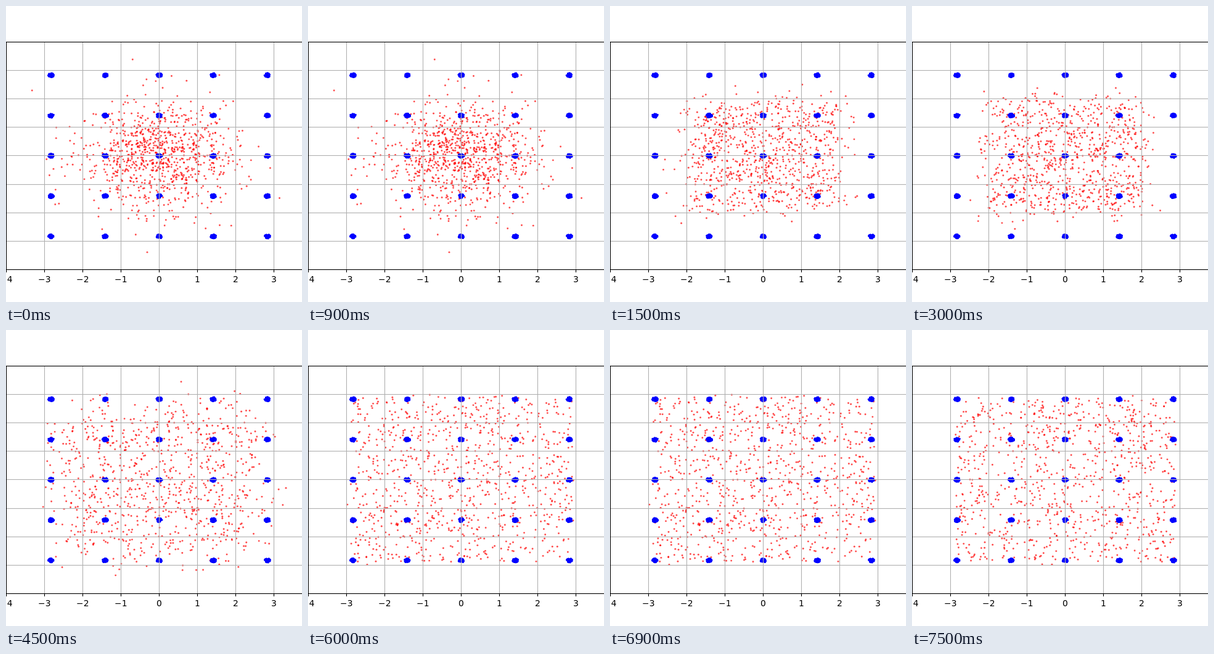
An HTML page with a canvas for the animation above (8000 ms loop, 480 by 480 pixels).

```html
<!DOCTYPE html>
<html lang="en">
<head>
<meta charset="utf-8">
<title>Samples approaching a grid of modes</title>
<style>
  html, body { margin: 0; width: 100%; height: 100%; overflow: hidden; background: #fff; }
  canvas { display: block; width: 480px; height: 480px; }
</style>
</head>
<body>
<canvas id="stage" width="480" height="480"></canvas>
<script>
const ctx = document.getElementById('stage').getContext('2d');
const LOOP = 8000, STEP = 1500, SAMPLES = 900;
const TOP = 58, BOTTOM = 427, LINE = 1.11;

const toX = x => 248 + 62 * x;
const toY = y => 242.4 - 46.2 * y;

// Each stage is a uniform box (half sizes) blurred by Gaussian noise.
const stages = [
  { halfX: 0, halfY: 0, noise: 1 },
  { halfX: 1.95, halfY: 1.9, noise: 0.29 },
  { halfX: 2.0, halfY: 1.95, noise: 0.24 },
  { halfX: 2.5, halfY: 2.5, noise: 0.42 },
  { halfX: 2.86, halfY: 2.86, noise: 0.08 },
  { halfX: 2.86, halfY: 2.86, noise: 0.08 }
];

function randomSource(seed) {
  const uniform = () => {
    seed = (seed + 0x6D2B79F5) | 0;
    let t = Math.imul(seed ^ (seed >>> 15), 1 | seed);
    t = (t + Math.imul(t ^ (t >>> 7), 61 | t)) ^ t;
    return ((t ^ (t >>> 14)) >>> 0) / 4294967296;
  };
  const normal = () =>
    Math.sqrt(-2 * Math.log(1 - uniform())) * Math.cos(2 * Math.PI * uniform());
  return { uniform, normal };
}

function dot(x, y, radius) {
  ctx.beginPath();
  ctx.arc(toX(x) + 0.5, toY(y) + 0.5, radius, 0, 2 * Math.PI);
  ctx.fill();
}

function drawSamples(index) {
  const { halfX, halfY, noise } = stages[index];
  const { uniform, normal } = randomSource(101 + index * 37);
  ctx.fillStyle = 'rgba(255, 0, 0, 0.7)';
  for (let i = 0; i < SAMPLES; i++) {
    const x = halfX * (2 * uniform() - 1) + noise * normal();
    const y = halfY * (2 * uniform() - 1) + noise * normal();
    dot(x, y, 1.45);
  }
}

function drawModes() {
  const { uniform } = randomSource(5);
  ctx.fillStyle = '#00f';
  for (let row = -2; row <= 2; row++) {
    for (let col = -2; col <= 2; col++) {
      for (let i = 0; i < 60; i++) {
        const angle = 2 * Math.PI * uniform();
        const radius = 0.075 * Math.sqrt(uniform());
        dot(col * Math.SQRT2 + radius * Math.cos(angle),
            row * Math.SQRT2 + radius * Math.sin(angle), 1.5);
      }
    }
  }
}

const inset = (LINE - 1) / 2;
const horizontal = y => ctx.fillRect(0, y - inset, 480, LINE);
const vertical = (x, top, bottom) => ctx.fillRect(x - inset, top, LINE, bottom - top);

function drawAxes() {
  ctx.fillStyle = '#b0b0b0';
  for (let k = -3; k <= 3; k++) {
    vertical(toX(k), TOP, BOTTOM);
    horizontal(Math.round(toY(k)));
  }
  ctx.fillStyle = '#000';
  horizontal(TOP);
  horizontal(BOTTOM);
  vertical(0, TOP, BOTTOM);

  ctx.font = '13.89px "DejaVu Sans", sans-serif';
  for (let k = -4; k <= 3; k++) {
    const label = String(k).replace('-', '\u2212');
    vertical(toX(k), BOTTOM, BOTTOM + 5);
    ctx.fillText(label, Math.round(toX(k) - ctx.measureText(label).width / 2), 448);
  }
}

function draw(index) {
  ctx.fillStyle = '#fff';
  ctx.fillRect(0, 0, 480, 480);
  drawSamples(index);
  drawModes();
  drawAxes();
}

const start = performance.now();
let shown = -1;
function tick() {
  const index = Math.floor(((performance.now() - start) % LOOP) / STEP);
  if (index !== shown) draw(shown = index);
  requestAnimationFrame(tick);
}
tick();
</script>
</body>
</html>
```
